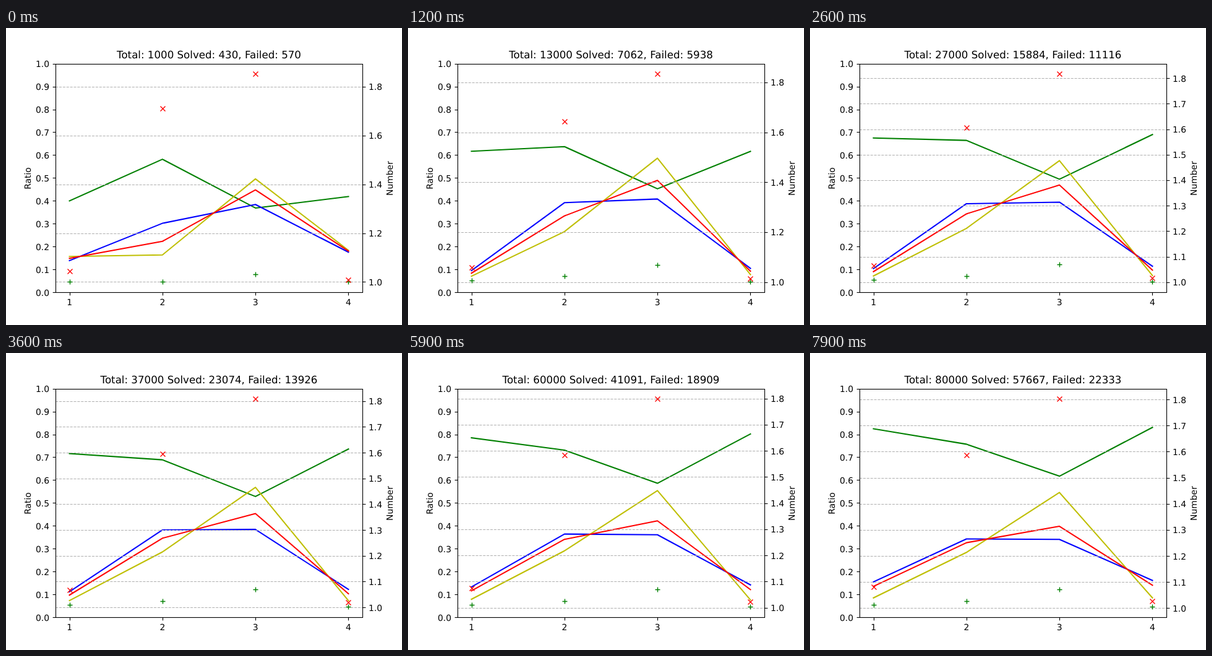
These frames come from a looping animation (640x480 px, 8000 ms). An HTML page:

```html
<!DOCTYPE html>
<html lang="en">
<head>
<meta charset="utf-8">
<title>Solve ratio</title>
<style>
  html, body { margin: 0; width: 100%; height: 100%; overflow: hidden; background: #fff; }
  svg { display: block; width: 640px; height: 480px; }
  text { font: 13.89px "DejaVu Sans", sans-serif; fill: #000; text-rendering: geometricPrecision; }
  #title { font-size: 16.67px; }
  .axis { fill: none; stroke: #000; stroke-width: 1.11; }
  .grid { fill: none; stroke: #b0b0b0; stroke-width: 1.11; stroke-dasharray: 4.11 1.78; }
  .line { fill: none; stroke-width: 2.08; stroke-linecap: square; stroke-linejoin: round; }
  .mark { fill: none; stroke-width: 1.39; }
  .mid { text-anchor: middle; }
  .end { text-anchor: end; }
</style>
</head>
<body>
<svg id="chart" viewBox="0 0 640 480"></svg>
<script>
const STEP = 100, STEPS = 80;
const LEFT = 80, RIGHT = 576, TOP = 57.6, BOTTOM = 427.2;
const HEIGHT = BOTTOM - TOP, LOW_Y = 410.4, SPAN_Y = 336;
const XS = [1, 2, 3, 4].map(i => 102.55 + 150.3 * (i - 1));
const GREEN = '#008000', BLUE = '#0000ff', YELLOW = '#bfbf00', RED = '#ff0000';

// Key points of the solved counter; totals are in thousands.
const TOTALS = [0, 1, 13, 27, 37, 46, 60, 80];
const SOLVED = [0, 430, 7062, 15884, 23074, 29933, 41091, 57667];

// Smooth curve through the key points.
function curve(xs, ys) {
  const last = xs.length - 1;
  const secant = i => (ys[i + 1] - ys[i]) / (xs[i + 1] - xs[i]);
  const slope = i => {
    if (i === 0) return secant(0);
    if (i === last) return 2 * secant(i - 1) - slope(i - 1);
    const a = xs[i] - xs[i - 1], b = xs[i + 1] - xs[i];
    return (b * secant(i - 1) + a * secant(i)) / (a + b);
  };
  return x => {
    let i = 0;
    while (i < last - 1 && x >= xs[i + 1]) i++;
    const h = xs[i + 1] - xs[i], u = (x - xs[i]) / h, w = 1 - u;
    return ys[i] * w * w * (1 + 2 * u) + ys[i + 1] * u * u * (3 - 2 * u)
      + h * u * w * (slope(i) * w - slope(i + 1) * u);
  };
}
const solvedAt = curve(TOTALS, SOLVED);

// Share of a group: a slow parabola plus a start-up error that averages out.
const share = (a, b, c, early) => n => {
  const u = n / STEPS;
  return a + b * u + c * u * u + early * n ** -1.5;
};
// The last share is what remains of 1.
const spread = shares => n => {
  const values = shares.map(f => f(n));
  return [...values, 1 - values.reduce((a, b) => a + b)];
};
const solvedShares = spread([
  share(.0865, .0417, .0266, .0515),
  share(.397, -.0117, -.0425, -.0949),
  share(.422, -.081, 0, -.037)
]);
const failedShares = spread([
  share(.0665, .01, .0085, .0901),
  share(.251, .114, -.081, -.0887),
  share(.602, -.086, .03, -.105)
]);

// Marker height in pixels: level, drift over the loop, decaying start offset.
const settle = tau => (level, drift = 0, early = 0) => n =>
  level + drift * n / STEPS + early * Math.exp((1 - n) / tau);
const quick = settle(4), slow = settle(13);
const MARKS = [
  { color: GREEN, shape: 'm-4 0h8m-4 -4v8',
    at: [quick(407.4, 0, 2.6), quick(400.5, 0, 9.5), quick(382.4, 0, 15.6), quick(410)] },
  { color: RED, shape: 'm-4 -4l8 8m0 -8l-8 8',
    at: [slow(386, -8, 7), slow(165.5, 0, -35.5), slow(74), slow(404.5, -3.6, 2.5)] }
];

const numberMin = u => 1 + .0046 * u ** 1.5;
const numberMax = u => 1.8538 - .14 * u + .088 * u * u;

const snap = v => Math.floor(v + .5) + .5;
const ratioY = v => BOTTOM - HEIGHT * v;
const baseline = y => Math.round(y + 5.5);
const chart = document.getElementById('chart');

function add(tag, attrs, parent = chart) {
  const el = document.createElementNS('http://www.w3.org/2000/svg', tag);
  for (const key in attrs) el.setAttribute(key, attrs[key]);
  return parent.appendChild(el);
}

function label(str, x, y, attrs = {}, parent = chart) {
  const el = add('text', { x, y, ...attrs }, parent);
  el.textContent = str;
  return el;
}

const lines = [GREEN, BLUE, YELLOW, RED].map(stroke => add('polyline', { class: 'line', stroke }));
const grid = add('g', {});
const marks = MARKS.map(m => add('path', { class: 'mark', stroke: m.color }));

add('rect', { class: 'axis', x: 80.5, y: 58.5, width: 496, height: 369 });
XS.forEach((x, i) => {
  add('path', { class: 'axis', d: `M${snap(x)} 427.5v4.86` });
  label(i + 1, x, 448, { class: 'mid' });
});
for (let i = 0; i <= 10; i++) {
  const y = ratioY(i / 10);
  add('path', { class: 'axis', d: `M80.5 ${snap(y)}h-4.86` });
  label((i / 10).toFixed(1), 70.1, baseline(y), { class: 'end' });
}
label('Ratio', 0, 0, { class: 'mid', transform: 'translate(40 243) rotate(-90)' });
label('Number', 0, 0, { class: 'mid', transform: 'translate(625 243) rotate(-90)' });
const ticks = add('g', {});
const title = label('', 328, 49, { id: 'title', class: 'mid' });

function drawNumberAxis(u) {
  const lo = numberMin(u), range = numberMax(u) - lo;
  const gap = range * 1.1 / 9 <= .1 ? 1 : 2;
  grid.replaceChildren();
  ticks.replaceChildren();
  for (let tenth = 10; tenth < 20; tenth += gap) {
    const y = LOW_Y - (tenth / 10 - lo) / range * SPAN_Y;
    if (y < TOP) break;
    add('path', { class: 'grid', d: `M${LEFT} ${snap(y)}H${RIGHT}` }, grid);
    add('path', { class: 'axis', d: `M576.5 ${snap(y)}h4.86` }, ticks);
    label((tenth / 10).toFixed(1), 586, baseline(y), {}, ticks);
  }
}

function draw(n) {
  const total = n * 1000, solved = Math.round(solvedAt(n)), rate = solved / total;
  title.textContent = `Total: ${total} Solved: ${solved}, Failed: ${total - solved}`;

  const blue = solvedShares(n), yellow = failedShares(n);
  const red = blue.map((b, i) => rate * b + (1 - rate) * yellow[i]);
  const green = blue.map((b, i) => rate * b / red[i]);
  [green, blue, yellow, red].forEach((values, k) => lines[k].setAttribute('points',
    values.map((v, i) => `${XS[i]},${ratioY(v).toFixed(2)}`).join(' ')));

  MARKS.forEach(({ at, shape }, k) => marks[k].setAttribute('d',
    at.map((f, i) => `M${snap(XS[i])} ${snap(f(n))}${shape}`).join('')));
  drawNumberAxis(n / STEPS);
}

const start = performance.now();
let shown = 0;
function tick() {
  const n = Math.floor((performance.now() - start) / STEP) % STEPS + 1;
  if (n !== shown) draw(shown = n);
  requestAnimationFrame(tick);
}
tick();
</script>
</body>
</html>
```
